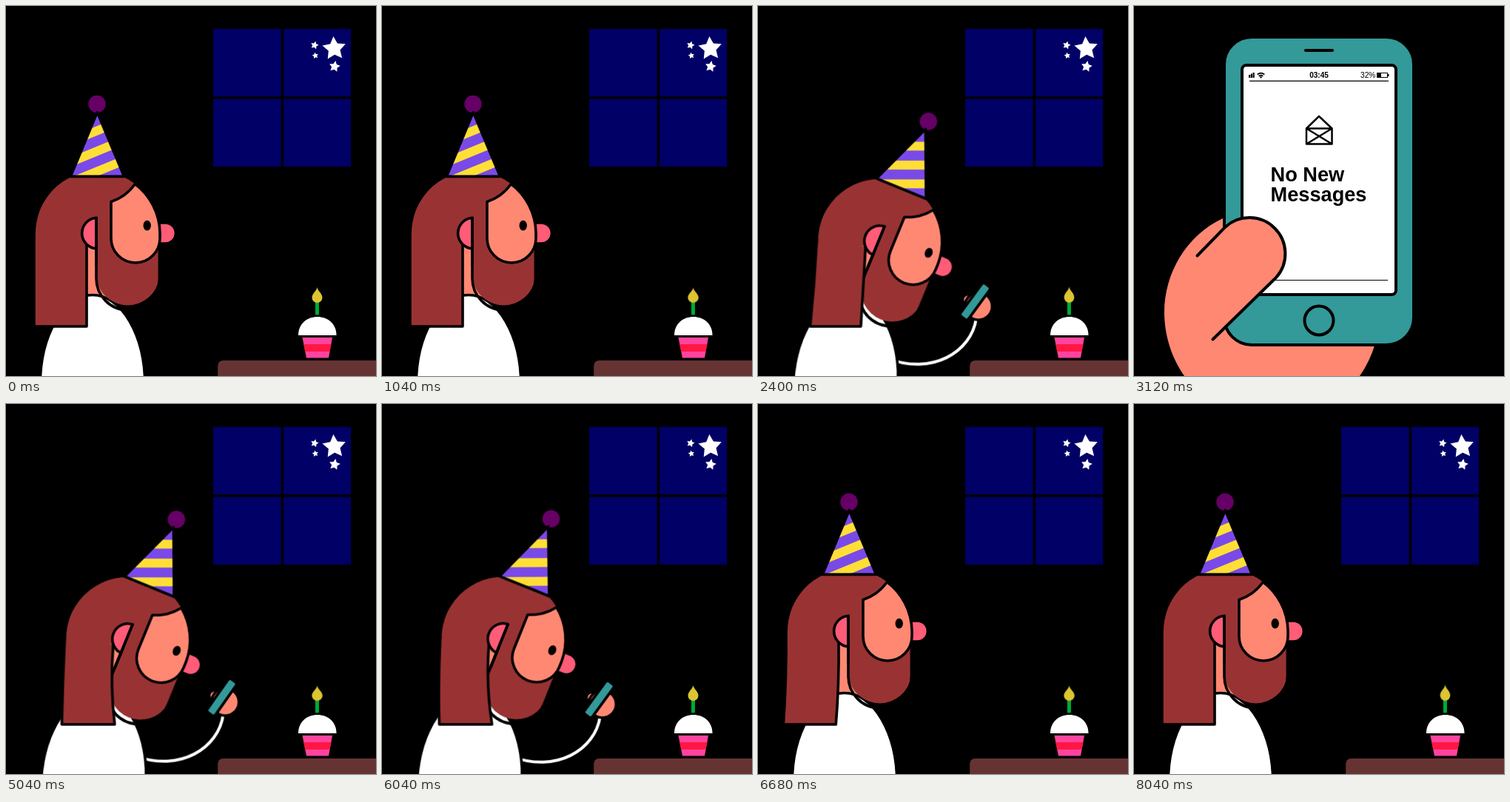
Write an HTML page without scripts that moves like this. It is 500 px wide and 500 px high and loops after 8.08 s.

```html
<!DOCTYPE html>
<html lang="en">
<head>
<meta charset="utf-8">
<title>Birthday night</title>
<style>
  html, body { margin: 0; width: 100%; height: 100%; overflow: hidden; background: #000; }
  svg { display: block; width: 100vw; height: 100vh; }

  .ink { stroke: #000; stroke-width: 3.6; stroke-linejoin: round; stroke-linecap: round; }
  .skin { fill: #ff8873; }
  .pink { fill: #ff5c78; }
  .brown { fill: #993333; }
  .teal { fill: #339999; }
  .line { fill: none; }

  .lean, .arm, .hair, .eye, .closeup, .phone { animation: 8.08s linear infinite; }
  .lean { animation-name: lean; }
  .head { --to: rotate(22.3deg); transform-origin: 117px 416.5px; }
  .torso { --to: rotate(3.8deg); transform-origin: 117px 530px; }
  .drift { --to: translateX(41.4px); }
  .arm { animation-name: lift; transform-origin: 165px 490px; }
  .hair { animation-name: sway; }
  .eye { animation-name: blink; transform-origin: 190.7px 296.7px; }
  .closeup { animation-name: cut; animation-timing-function: step-end; }
  .phone { animation-name: rise; }
  .flame { animation: flicker .808s step-end infinite; transform-origin: 420.5px 401px; }

  @keyframes lean {
    0%, 24.505% { transform: none; animation-timing-function: cubic-bezier(.65, 0, .35, 1); }
    29.703%, 73.886% { transform: var(--to); animation-timing-function: cubic-bezier(.65, 0, .35, 1); }
    80.198%, 100% { transform: none; }
  }
  @keyframes lift {
    0%, 24.752% { transform: translate(-3px, 11px) rotate(44deg); animation-timing-function: cubic-bezier(.65, 0, .35, 1); }
    30.693%, 73.886% { transform: translate(0, 0) rotate(-1.2deg); animation-timing-function: cubic-bezier(.65, 0, .35, 1); }
    79.455%, 100% { transform: translate(-3px, 11px) rotate(44deg); }
  }
  /* the hair tips trail behind the head and swing past their rest */
  @keyframes sway {
    0%, 24.505% { d: path("M38 306Q38 370 38 433H109Q109 380 109 320"); }
    28.094% { d: path("M38 310Q36 375 19 433H88Q104 380 107 321"); }
    29.703% { d: path("M38 317Q35 375 29 433H97.5Q101 380 104 325"); }
    31.188% { d: path("M38 317Q34 375 38 433H108Q98 380 104 325"); }
    32.673%, 73.886% { d: path("M38 317Q35 375 34 433H105.5Q99 380 103.5 325"); }
    75.495% { d: path("M38 316Q35 375 39 433H110Q100 380 104 324"); }
    77.228% { d: path("M39 309Q36 378 60 433H130.5Q108.5 380 108.5 321"); }
    78.094% { d: path("M38 306Q38 375 61 433H131Q109 380 109 320"); }
    79.208% { d: path("M38 306Q40 372 47 433H118Q111 380 109 320"); }
    81.188% { d: path("M38 306Q41 372 29 433H100Q112 380 109 320"); }
    83.168% { d: path("M38 306Q38 370 36 433H107Q109 380 109 320"); }
    85.644%, 100% { d: path("M38 306Q38 370 38 433H109Q109 380 109 320"); }
  }
  @keyframes blink {
    0%, 8.416%, 10.396%, 100% { transform: none; }
    9.406% { transform: scaleY(.1); }
  }
  @keyframes cut {
    0% { visibility: hidden; }
    34.653% { visibility: visible; }
    62.376%, 100% { visibility: hidden; }
  }
  @keyframes rise {
    0%, 34.2% { transform: translateY(470px); animation-timing-function: cubic-bezier(.2, .6, .3, 1); }
    38.614%, 100% { transform: none; }
  }
  @keyframes flicker {
    0%, 40%, 70% { transform: none; }
    10%, 50%, 90% { transform: scale(.98, 1.04); }
    20%, 60% { transform: scale(1.03, .98); }
    30%, 80% { transform: skewX(3deg); }
  }
</style>
</head>
<body>
<svg viewBox="0 0 500 500">
  <defs>
    <path id="star" fill="#fff" d="M0-1 .294-.405 .951-.309 .476 .155 .588 .809 0 .5-.588 .809-.476 .155-.951-.309-.294-.405Z"/>
    <path id="cone" d="M123.3 143.5 87.3 230.4H159.6Z"/>
    <clipPath id="coneClip"><use href="#cone"/></clipPath>
    <clipPath id="cupClip"><path d="M400.5 448H441L436 475.5H406Z"/></clipPath>
  </defs>
  <rect width="500" height="500"/>

  <!-- window -->
  <rect x="280" y="31" width="186" height="186" fill="#000066"/>
  <path class="ink" d="M373.4 31V217M280 124H466"/>
  <use href="#star" transform="translate(443.5 57.5) rotate(-4) scale(16.5)"/>
  <use href="#star" transform="translate(417 53) rotate(14) scale(5.6)"/>
  <use href="#star" transform="translate(418 67) rotate(-10) scale(4.4)"/>
  <use href="#star" transform="translate(444 81.8) rotate(10) scale(7.8)"/>

  <g class="arm">
    <path class="line" stroke="#fff" stroke-width="4" d="M175 476C235 499 288 468 295 422"/>
    <circle class="skin ink" cx="283.5" cy="396.5" r="7"/>
    <circle class="skin ink" cx="298" cy="405.5" r="18.5"/>
    <rect class="teal ink" x="-27.5" y="-6.7" width="55" height="13.4" rx="3.5" transform="translate(293.5 399) rotate(-53.8)"/>
  </g>

  <g class="lean torso">
    <rect class="skin" x="105" y="312" width="45" height="84"/>
    <ellipse class="ink" fill="#fff" cx="117" cy="512" rx="70.8" ry="121.5"/>
  </g>

  <g class="lean head">
    <path class="brown" d="M51 348A83.5 83.5 0 1 1 207 306H130L109 320Z"/>
    <rect class="pink" x="195" y="294.8" width="32.6" height="24.4" rx="12.2"/>
    <path class="brown" d="M122 286V368A43 43 0 0 0 207 368V300Z"/>
    <path class="ink line" d="M122 320V368A42.7 43 0 0 0 207.4 368V325"/>
    <path class="skin ink" d="M142 264.5Q162 258 174.5 240.5A84.5 84.5 0 0 1 208 306V314A33 33 0 0 1 142 314Z"/>
    <ellipse class="eye" cx="190.7" cy="296.7" rx="5.2" ry="6.9"/>
    <circle cx="123" cy="132.5" r="11.7" fill="#660066"/>
    <g clip-path="url(#coneClip)">
      <use href="#cone" fill="#7a4ae8"/>
      <g fill="#ffdf36" transform="rotate(-22.3 117 416.5)">
        <rect x="140" y="183.5" width="100" height="11.8"/>
        <rect x="140" y="209" width="100" height="12"/>
        <rect x="140" y="234.3" width="100" height="12"/>
      </g>
    </g>
    <use href="#cone" class="ink line"/>
  </g>

  <g class="lean drift">
    <path class="hair brown ink" d="M38 306Q38 370 38 433H109Q109 380 109 320"/>
  </g>
  <g class="lean head">
    <path class="pink ink" d="M122 286.3A20.8 20.8 0 0 0 122 327.8Z"/>
    <path class="ink" d="M122 286.3V350"/>
  </g>

  <!-- table and cake -->
  <path class="ink" fill="#663333" d="M284.4 504V487Q284.4 477.3 294 477.3H504V504Z"/>
  <path fill="#fff" d="M395 445C395 411.5 446.5 411.5 446.5 445Z"/>
  <g clip-path="url(#cupClip)">
    <rect x="398" y="448" width="46" height="28" fill="#ff449f"/>
    <rect x="398" y="457" width="46" height="10" fill="#ff1744"/>
  </g>
  <rect x="418" y="400" width="5" height="17.3" fill="#00a833"/>
  <path class="flame" fill="#ddc433" d="M420.5 380C421 385 427.5 388.500 427.5 394A7 7 0 0 1 413.5 394C413.500 388.500 420 385 420.5 380Z"/>

  <g class="closeup">
    <rect width="500" height="500"/>
    <g class="phone">
      <path class="skin" d="M121 286.500C70 310 41 362 41 414C41 447 52 477 68 500V520H295L305 500Q319 480 326 456Z"/>
      <rect class="teal" stroke="#000" stroke-width="4" x="122" y="42" width="256" height="416" rx="37"/>
      <g stroke="#000" stroke-width="4" stroke-linecap="round">
        <path d="M232 60H268"/>
        <circle class="line" cx="250" cy="425" r="19.5"/>
        <rect x="146" y="80" width="208" height="310" rx="6" fill="#fff"/>
      </g>

      <!-- status bar -->
      <path d="M155 97V93H157.3V97ZM157.900 97V91.500H160V97ZM160.600 97V90H162.700V97Z"/>
      <g class="line" stroke="#000" stroke-width="1.7">
        <path d="M166.700 92.600Q171.500 88.600 176.300 92.600M168.700 94.800Q171.500 92.400 174.300 94.800"/>
      </g>
      <circle cx="171.500" cy="96.300" r="1.200"/>
      <g font-family="'Liberation Sans', Arial, sans-serif">
        <text x="250" y="97" font-size="10" font-weight="700" text-anchor="middle">03:45</text>
        <text x="306" y="97" font-size="10.2">32%</text>
        <text font-size="27.2" font-weight="700"><tspan x="184.500" y="237">No New</tspan><tspan x="184.500" y="264">Messages</tspan></text>
      </g>
      <rect class="line" x="328.500" y="90.500" width="14" height="6" stroke="#000"/>
      <path d="M329 91H334V96.500H329ZM343 92H344.500V95H343Z"/>
      <path stroke="#000" stroke-width="1.200" d="M156 101.300H344M156 370.500H343"/>

      <path class="line" stroke="#000" stroke-width="2.500" stroke-linejoin="round" d="M233 165.500 250 149 267.500 165.500V186.500H233ZH267.500L233 186.500M233 165.500 267.500 186.500"/>
      <path class="skin ink" style="stroke-width:4" d="M85.500 337.500 123.300 298.700A48.500 48.500 0 0 1 192 367L106.500 450.500"/>
    </g>
  </g>
</svg>
</body>
</html>
```
